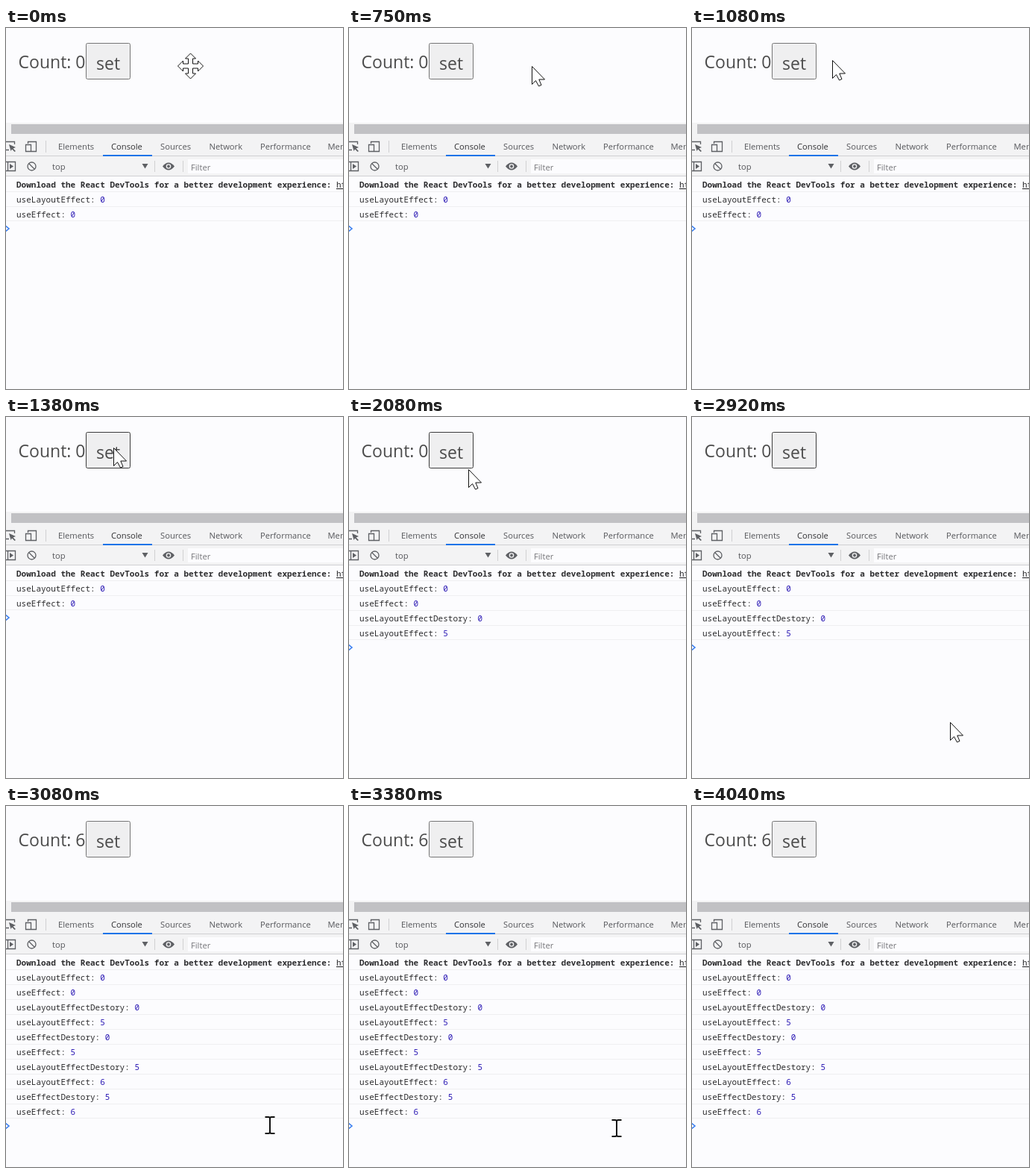
Animation, 452 px wide and 484 px high, one loop 4.58 s. Source, as an HTML page:

```html
<!DOCTYPE html>
<html lang="en">
<head>
<meta charset="utf-8">
<title>Effect order in the console</title>
<style>
  html, body { margin: 0; height: 100%; overflow: hidden; background: #fcfcfe; }
  svg { display: block; width: 452px; height: 484px; }
  text { white-space: pre; }
  .page { font: 23px "Open Sans", sans-serif; fill: #4c4c4c; }
  .ui { font: 11.2px "Open Sans", sans-serif; fill: #55565a; }
  .log { font: 11px "Noto Sans Mono", monospace; fill: #2c2c2e; }
  .log .value { fill: #2a18b4; }
  .icon { fill: none; stroke: #5e6064; stroke-width: 1.3; }
  .solid { fill: #5e6064; }
  .bar { fill: #f3f3f4; }
  .rule { stroke: #d0d0d2; }
  .row-rule { stroke: #efeff1; }
  .cursor { fill: #fff; stroke: #111; stroke-width: 1; }
</style>
</head>
<body>
<svg viewBox="0 0 452 484">
  <rect width="452" height="484" fill="#fcfcfe"/>

  <text id="count" class="page" x="16.5" y="54"></text>
  <rect id="button" x="107.5" y="20.5" width="59" height="48" rx="2" fill="#efeff0"/>
  <text class="page" x="121" y="55.5">set</text>

  <rect class="bar" y="127" width="452" height="72"/>
  <rect x="7" y="129" width="445" height="13" fill="#c1c1c4"/>
  <path class="rule" d="M0 171.5H452M0 198.5H452M53.5 151V167M199.5 178V193M237.5 178V193"/>
  <rect x="130" y="170" width="66" height="2" fill="#1a73e8"/>
  <rect x="244" y="176" width="208" height="19" fill="#fcfcfe"/>

  <g class="ui">
    <text x="70" y="163">Elements</text>
    <text x="141" y="163" style="fill:#303033">Console</text>
    <text x="207" y="163">Sources</text>
    <text x="272.5" y="163">Network</text>
    <text x="341" y="163">Performance</text>
    <text x="431.5" y="163">Memory</text>
    <text x="62" y="190">top</text>
    <text x="248" y="191" style="fill:#757579">Filter</text>
  </g>

  <path class="icon" d="M4 163.5H-1V152.500H11.500V156M29.500 155V152.500H40.500V165.500H34M26.500 156.500H33.500V165.500H26.500Z"/>
  <path class="solid" d="M4 156L13 160L9.500 161.500L13 165L11.500 166L8 162.500L6.500 165Z"/>
  <path class="icon" d="M-1 179.500H12.500V191.500H-1M2.500 179.500V191.500"/>
  <path class="solid" d="M5 182L10 185.500L5 189ZM182.500 182H190.500L186.500 188.500Z"/>
  <g class="icon">
    <circle cx="34.5" cy="185.5" r="5.5"/>
    <path d="M30.500 181.500L38.500 189.500"/>
  </g>
  <path class="solid" d="M210 185.500Q218 175.500 226 185.500Q218 195.500 210 185.500Z"/>
  <circle cx="218" cy="185.5" r="3.3" fill="#f3f3f4"/>
  <circle cx="218" cy="185.5" r="1.9" class="solid"/>

  <g class="log">
    <text x="14" y="214" font-weight="700">Download the React DevTools for a better development experience: <tspan font-weight="400" text-decoration="underline">https</tspan></text>
    <path class="row-rule" d="M0 219.500H452"/>
    <g id="rows"></g>
  </g>
  <path id="lastRule" class="row-rule" d="M0 0H452"/>
  <path id="prompt" d="M-1 -4L4 0L-1 4" fill="none" stroke="#367cf1" stroke-width="1.5"/>

  <g id="cursor">
    <path id="move" class="cursor" d="M.5-17L7.500-10H3.500V-3H10.500V-7L17.500 0L10.500 7V3H3.500V10H7.500L.5 17L-6.500 10H-2.500V3H-9.500V7L-16.500 0L-9.500-7V-3H-2.500V-10H-6.500Z"/>
    <path id="arrow" class="cursor" d="M.5 .5V24.500L5.500 19.500L9.500 27L13 25.500L9.800 18H17.500Z"/>
    <path id="beam" fill="none" stroke="#111" stroke-width="2" d="M-6.500-11H-2Q0-11 0-9Q0-11 2-11H6.500M0-9V9M-6.500 11H-2Q0 11 0 9Q0 11 2 11H6.500"/>
  </g>
</svg>
<script>
const $ = id => document.getElementById(id);
const LOOP = 4580, FPS = 24;

const logs = [
  ["useLayoutEffect", 0], ["useEffect", 0],
  ["useLayoutEffectDestory", 0], ["useLayoutEffect", 5],
  ["useEffectDestory", 0], ["useEffect", 5],
  ["useLayoutEffectDestory", 5], ["useLayoutEffect", 6],
  ["useEffectDestory", 5], ["useEffect", 6]
];

$("rows").innerHTML = logs.map(([name, value], i) => `<g>
  <text x="14" y="${234 + 20 * i}">${name}: <tspan class="value">${value}</tspan></text>
  <path class="row-rule" d="M0 ${239.5 + 20 * i}H452"/>
</g>`).join("");
const rows = [...$("rows").children];

// Pointer path: [tick, x, y]
const path = [
  [0, 247, 51], [17, 247, 51], [18, 245, 51], [24, 202, 44], [30, 160, 40],
  [31, 154, 43], [33, 144, 41], [47, 144, 41], [51, 165, 79], [58, 265, 240],
  [60, 291, 300], [61, 291, 300], [70, 346, 409], [74, 354, 428],
  [81, 359, 432], [82, 359, 432], [87, 372, 460], [96, 384, 486]
];

function pointerAt(tick) {
  const i = path.findIndex(p => p[0] >= tick);
  if (i <= 0) return path[0].slice(1);
  const [t0, x0, y0] = path[i - 1], [t1, x1, y1] = path[i];
  const k = (tick - t0) / (t1 - t0);
  return [x0 + (x1 - x0) * k, y0 + (y1 - y0) * k].map(Math.round);
}

const show = (el, on) => { el.style.display = on ? "" : "none"; };

function draw(time) {
  const tick = Math.floor((time % LOOP + 5) * FPS / 1000);
  const shown = tick < 48 ? 2 : tick < 72 ? 4 : logs.length;
  const bottom = 219 + 20 * shown;

  $("count").textContent = "Count: " + (tick < 72 ? 0 : 6);
  $("button").setAttribute("stroke", tick >= 30 && tick < 72 ? "#3c3c3c" : "#767676");
  rows.forEach((row, i) => {
    show(row, i < shown);
    show(row.lastElementChild, i < shown - 1);
  });
  $("lastRule").setAttribute("transform", `translate(0 ${bottom - .5})`);
  $("prompt").setAttribute("transform", `translate(0 ${bottom + 10})`);

  const visible = tick < 97;
  show($("cursor"), visible);
  if (visible) {
    const kind = tick < 5 ? "move" : tick >= 73 && tick < 84 ? "beam" : "arrow";
    for (const id of ["move", "arrow", "beam"]) show($(id), id === kind);
    $("cursor").setAttribute("transform", `translate(${pointerAt(tick)})`);
  }
}

const start = performance.now();
function loop() {
  draw(performance.now() - start);
  requestAnimationFrame(loop);
}
loop();
</script>
</body>
</html>
```
